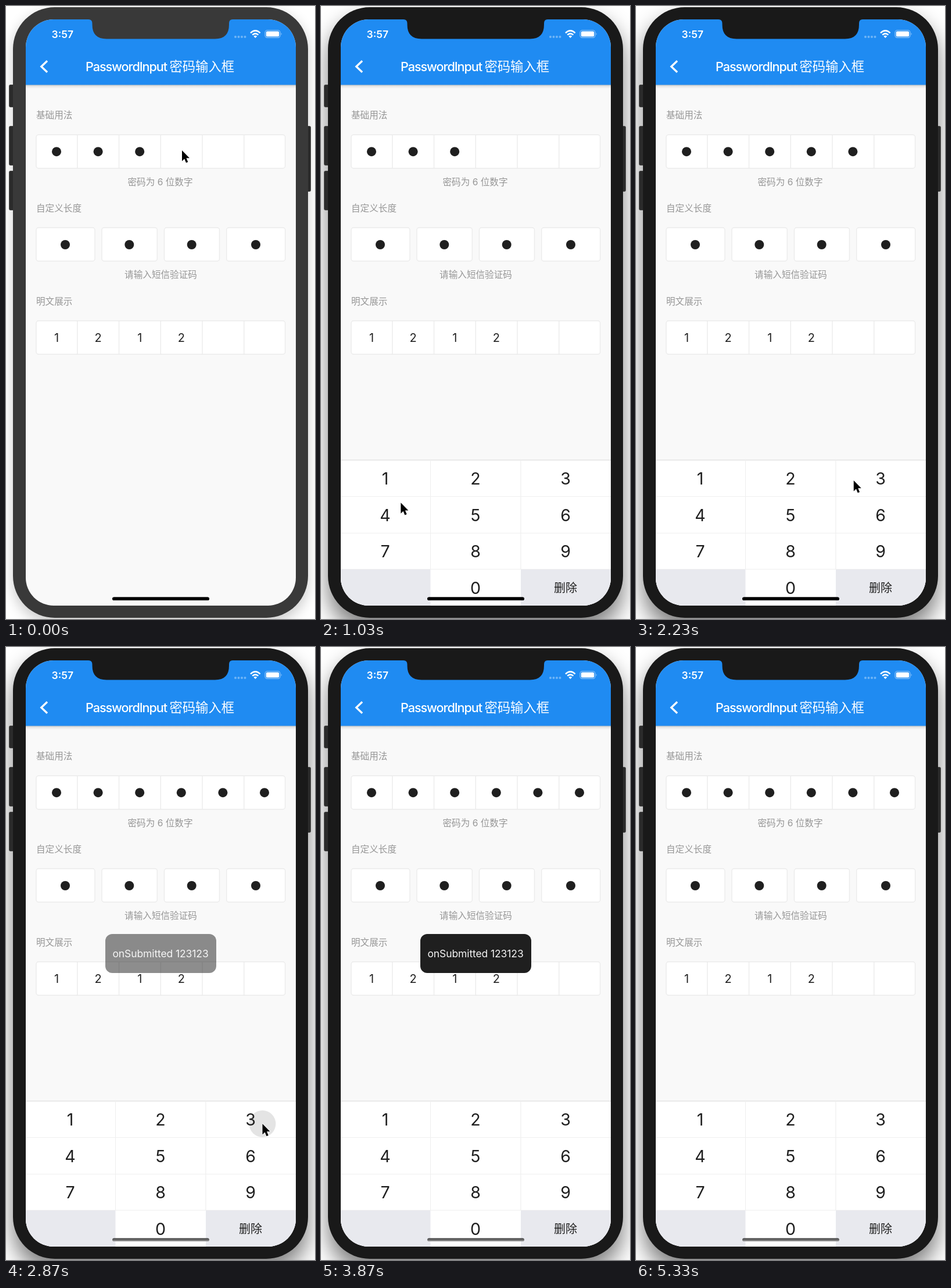
These frames come from a looping animation (532x1053 px, 5430 ms). An HTML page:

```html
<!DOCTYPE html>
<html lang="zh-CN">
<head>
<meta charset="utf-8">
<title>Password input</title>
<style>
html, body { margin: 0; width: 100%; height: 100%; overflow: hidden; background: #fff; }
svg { display: block; width: 100%; height: 100%; }
text { font-family: Inter, "Noto Sans CJK SC", "Noto Sans CJK", sans-serif; }
.cjk { font-family: "Noto Sans CJK SC", "Noto Sans CJK", sans-serif; }
.label { font-size: 15.6px; fill: #969696; }
.mid { text-anchor: middle; }
.box { fill: #fff; stroke: #ebebeb; stroke-width: 1.4; }
.line { stroke: #ebebeb; stroke-width: 1.4; }
.keyline { stroke: #efefef; stroke-width: 1.2; }
.ink { fill: #1f1f1f; }
.body { fill: #191919; }
.idle .body { fill: #393939; }
.key { font-size: 28.6px; }
</style>
</head>
<body>
<svg id="stage" viewBox="0 0 532 1053" preserveAspectRatio="none">
  <defs>
    <filter id="soft" x="-20%" y="-20%" width="140%" height="140%"><feGaussianBlur stdDeviation="18"/></filter>
    <filter id="faint" x="-20%" y="-20%" width="140%" height="140%"><feGaussianBlur stdDeviation="11"/></filter>
    <linearGradient id="drop" x2="0" y2="1">
      <stop offset="0" stop-color="#000" stop-opacity=".24"/>
      <stop offset=".4" stop-color="#000" stop-opacity=".08"/>
      <stop offset="1" stop-color="#000" stop-opacity="0"/>
    </linearGradient>
    <linearGradient id="bar" x2="0" y2="1">
      <stop offset="0" stop-color="#383838"/>
      <stop offset="1" stop-color="#a2a2a2"/>
    </linearGradient>
    <clipPath id="screen"><rect x="34" y="23" width="465" height="1007" rx="48"/></clipPath>
  </defs>

  <rect id="shadow" x="12" y="22" width="508" height="1050" rx="70" fill="#000" opacity=".5" filter="url(#soft)"/>
  <rect id="idleShadow" x="12" y="10" width="508" height="1050" rx="70" fill="#000" opacity=".2" filter="url(#faint)"/>
  <g fill="#2b2b2b" stroke="#484848" stroke-width="1">
    <rect x="5.5" y="135.5" width="12" height="38" rx="2"/>
    <rect x="5.5" y="206.5" width="12" height="67" rx="2"/>
    <rect x="5.5" y="283.5" width="12" height="67" rx="2"/>
    <rect x="514" y="206.5" width="10.5" height="112" rx="2"/>
  </g>
  <rect class="body" x="12" y="2" width="508" height="1049" rx="72"/>

  <g clip-path="url(#screen)">
    <rect x="34" y="23" width="465" height="1007" fill="#f9f9f9"/>
    <rect x="34" y="135" width="465" height="7" fill="url(#drop)"/>
    <rect x="34" y="23" width="465" height="112.5" fill="#1f8bf2"/>
    <path class="body" d="M142 22V23Q148.500 23 148.500 30V32Q148.500 56.500 173 56.500H360Q384 56.500 384 32V30Q384 23 390 23V22Z"/>

    <g fill="#fff">
      <text x="78.500" y="54.500" font-size="17.5" font-weight="600">3:57</text>
      <g opacity=".36">
        <circle cx="395" cy="53" r="2"/><circle cx="400.500" cy="53" r="2"/>
        <circle cx="406" cy="53" r="2"/><circle cx="411.500" cy="53" r="2"/>
      </g>
      <g fill="none" stroke="#fff" stroke-width="2.500">
        <path d="M421 46.300Q429.300 38.500 437.600 46.300"/>
        <path d="M424.200 49.700Q429.300 45 434.400 49.700"/>
      </g>
      <path d="M426.400 52Q429.300 49.500 432.200 52L429.300 55Z"/>
      <rect x="446" y="41.800" width="26" height="12.600" rx="3.800" fill="none" stroke="#fff" stroke-opacity=".5" stroke-width="1.100"/>
      <rect x="447.800" y="43.600" width="22.400" height="9" rx="2.200"/>
      <path d="M473.600 46Q475.800 48 473.600 50.200Z" opacity=".5"/>
      <path d="M71 94.300L60.800 104L71 113.700" fill="none" stroke="#fff" stroke-width="3.300"/>
      <text x="137" y="112" font-size="21.6" font-weight="500" letter-spacing="-1.05">PasswordInput</text>
      <text class="cjk" x="281.500" y="112.400" font-size="22.300" font-weight="500">密码输入框</text>
    </g>

    <text class="cjk label" x="52" y="193">基础用法</text>
    <text class="label mid" x="265.500" y="307.500">密码为 6 位数字</text>
    <text class="cjk label" x="52" y="352.500">自定义长度</text>
    <text class="cjk label mid" x="266.500" y="467">请输入短信验证码</text>
    <text class="cjk label" x="52" y="512.500">明文展示</text>
    <g id="fields"></g>

    <g id="pad">
      <rect x="34" y="780" width="465" height="250" fill="#fff"/>
      <path d="M34 967.500H188.500V1030H34ZM344 967.500H499V1030H344Z" fill="#e8e9ee"/>
      <path d="M34 780H499" stroke="#e4e4e4" stroke-width="1.600"/>
      <path class="keyline" d="M34 842.500H499M34 905.500H499M34 967.500H499M188.500 780V967M344 780V967"/>
      <circle id="ripple" fill="#c8c8c8"/>
      <g id="keys"></g>
    </g>

    <g id="toast">
      <rect class="ink" x="171" y="493" width="191" height="67" rx="12"/>
      <text class="mid" x="266" y="533" font-size="17.500" letter-spacing="-.1" fill="#f4f4f4">onSubmitted 123123</text>
    </g>
    <rect x="183" y="1015.500" width="167" height="5.600" rx="2.800" fill="url(#bar)"/>
    <rect id="home" x="183" y="1015.500" width="167" height="5.600" rx="2.800"/>
  </g>

  <path id="cursor" d="M0 0V18.500L4.200 14.500L7 21.300L10.300 19.900L7.500 13.300H13Z" fill="#000" stroke="#fff" stroke-width="1.500" paint-order="stroke" stroke-linejoin="round"/>
</svg>
<script>
const LOOP = 5430;
const $ = id => document.getElementById(id);

function add(parent, tag, attrs, text) {
  const el = document.createElementNS('http://www.w3.org/2000/svg', tag);
  for (const k in attrs) el.setAttribute(k, attrs[k]);
  if (text) el.textContent = text;
  return parent.appendChild(el);
}

const fields = $('fields');
const cellX = i => 87 + 71.6 * i;
const box = (x, y, width) => add(fields, 'rect', { class: 'box', x, y, width, height: 57.5, rx: 4 });
const dot = (cx, cy) => add(fields, 'circle', { class: 'ink', cx, cy, r: 8 });

for (const y of [221.3, 540.8]) {
  box(52, y, 428.6);
  for (let i = 0; i < 5; i++) {
    const x = 122.8 + 71.75 * i;
    add(fields, 'path', { class: 'line', d: `M${x} ${y}v57.5` });
  }
}
const dots = Array.from({ length: 6 }, (_, i) => dot(cellX(i), 250.2));
for (const [x, w, c] of [[52, 101, 102], [165, 95.3, 212.3], [272.5, 95, 319.7], [379.7, 101, 430]]) {
  box(x, 380.7, w);
  dot(c, 410);
}
[1, 2, 1, 2].forEach((n, i) =>
  add(fields, 'text', { class: 'ink mid', x: cellX(i), y: 577, 'font-size': 20 }, n));

const keyX = [110.5, 266, 421];
for (let n = 1; n <= 9; n++)
  add($('keys'), 'text', { class: 'ink mid key', x: keyX[(n - 1) % 3], y: 822.3 + 62.5 * Math.floor((n - 1) / 3) }, n);
add($('keys'), 'text', { class: 'ink mid key', x: 266, y: 1010 }, '0');
add($('keys'), 'text', { class: 'ink mid cjk', x: 421, y: 1007, 'font-size': 20 }, '删除');

// time, x, y of the pointer tip
const path = [
  [0, 303, 248], [590, 303, 248], [800, 226, 560], [1030, 137.5, 853.5], [1130, 124, 822],
  [1200, 121, 817], [1430, 121, 817], [1700, 255, 816], [1770, 265, 816], [2030, 265, 816],
  [2230, 374.5, 815], [2470, 441.5, 819], [3200, 441.5, 819], [3600, 497, 816], [3760, 526, 814]
];
// press time, then ripple centre
const taps = [[1280, 121, 818], [1930, 265, 817], [2750, 441.5, 819]];

const ramp = (t, a, b) => Math.min(1, Math.max(0, (t - a) / (b - a)));

function pointer(t) {
  let i = 1;
  while (i < path.length - 1 && path[i][0] < t) i++;
  const [a, x, y] = path[i - 1], [b, u, v] = path[i];
  const k = ramp(t, a, b);
  return [x + (u - x) * k, y + (v - y) * k];
}

function draw(t) {
  const idle = t < 30;
  $('stage').classList.toggle('idle', idle);
  $('shadow').style.display = idle ? 'none' : '';
  $('idleShadow').style.display = idle ? '' : 'none';

  const rest = (1 - ramp(t, 265, 515)) ** 2;
  $('pad').setAttribute('transform', `translate(0 ${251 * rest})`);

  const typed = 3 + taps.filter(p => t >= p[0] + 60).length;
  dots.forEach((d, i) => d.style.display = i < typed ? '' : 'none');

  const tap = taps.find(p => t >= p[0] && t < p[0] + 280);
  const ripple = $('ripple');
  ripple.style.display = tap ? '' : 'none';
  if (tap) {
    const age = t - tap[0];
    ripple.setAttribute('cx', tap[1]);
    ripple.setAttribute('cy', tap[2]);
    ripple.setAttribute('r', 6 + age * .14);
    ripple.setAttribute('opacity', .5 * (1 - ramp(age, 120, 280)));
  }

  $('toast').setAttribute('opacity', ramp(t, 2750, 2990) * (1 - ramp(t, 5000, 5280)));
  $('home').setAttribute('opacity', 1 - ramp(t, 2500, 2840));

  const [x, y] = pointer(t);
  $('cursor').setAttribute('transform', `translate(${x} ${y})`);
  $('cursor').style.display = t < 3760 ? '' : 'none';
}

const start = performance.now();
function tick() {
  draw((performance.now() - start) % LOOP);
  requestAnimationFrame(tick);
}
tick();
</script>
</body>
</html>
```
